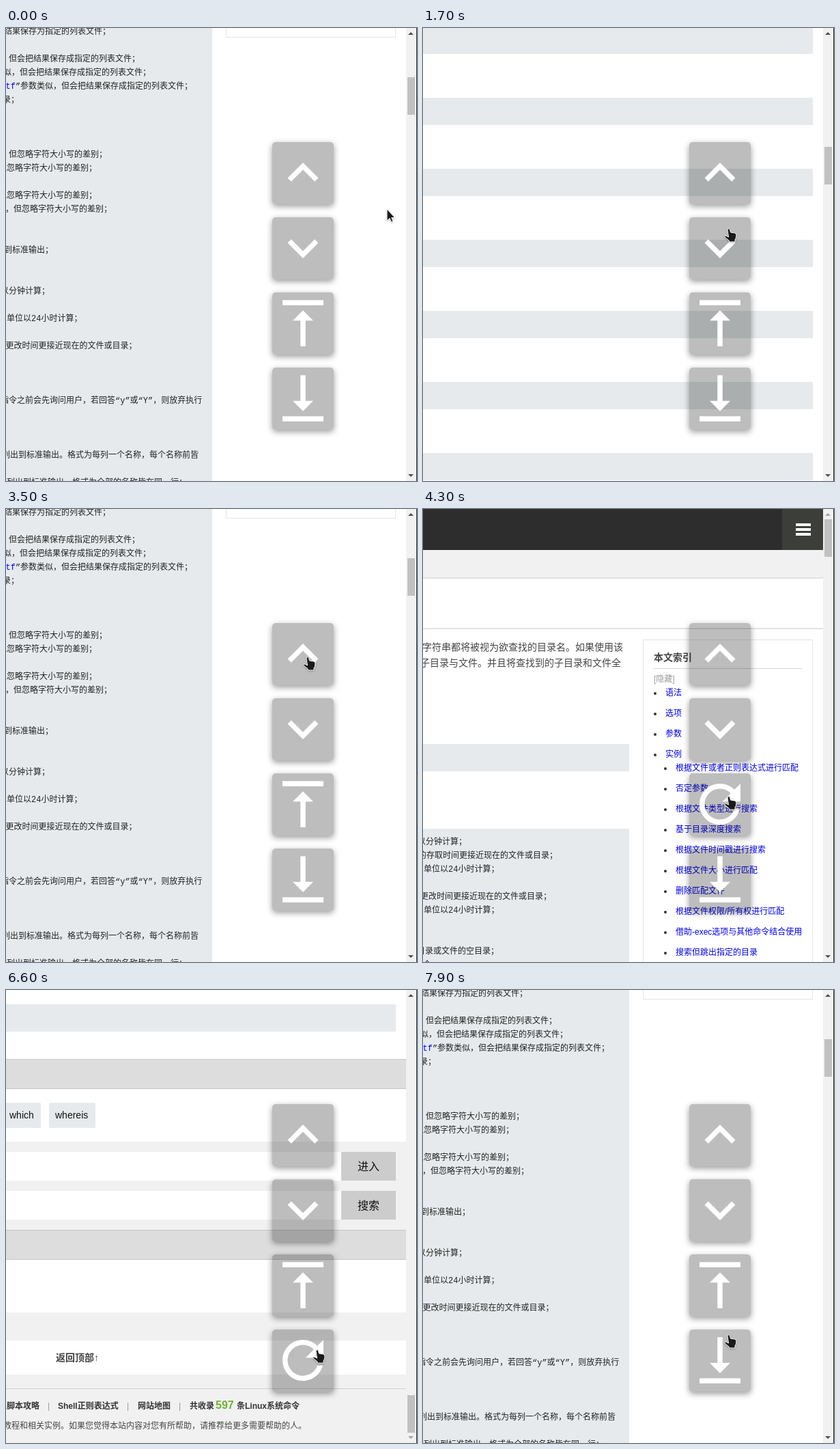
Animation, 602 px wide and 663 px high, one loop 8 s. Source, as an HTML page:

```html
<!DOCTYPE html>
<html lang="zh-CN">
<head>
<meta charset="utf-8">
<style>
html, body { margin: 0; width: 100%; height: 100%; overflow: hidden; background: #fff; }
#stage { position: relative; width: 602px; height: 663px; overflow: hidden; }
#stage div, #stage span, #stage svg { position: absolute; }
#page { left: 0; top: 0; width: 586px; height: 7579px; overflow: hidden; background: #fff; }
span { white-space: pre; line-height: 20px; font: 12px/20px "Liberation Sans", "Noto Sans CJK SC", sans-serif; color: #333; }
.code { font-family: "Liberation Mono", "Noto Sans CJK SC", monospace; color: #222; margin-top: 2px; }
.code b { font-weight: 400; color: #00f; }
.prose { font-size: 14px; color: #444; }
.title { font-size: 14px; font-weight: 700; color: #444; }
.link { color: #00e; }
.mute { color: #999; }
.tag { font-size: 14px; color: #111; }
.go { font-size: 16px; color: #111; }
.bold { font-weight: 700; }
.count { font-size: 16px; font-weight: 700; color: #70b235; }
.dot { width: 4px; height: 4px; border-radius: 50%; background: #333; }
.btn { left: 390px; width: 90px; height: 91px; border-radius: 5px; background: rgba(0,0,0,.26); box-shadow: 0 3px 10px rgba(0,0,0,.4); }
.btn svg { left: 0; top: 0; width: 90px; height: 90px; fill: #fff; }
#cursor { left: 0; top: 0; width: 602px; height: 663px; filter: drop-shadow(0 1px 1px rgba(0,0,0,.3)); }
</style>
</head>
<body>
<div id="stage">
  <div id="page"></div>
  <div id="buttons"></div>
  <div id="bar"></div>
  <svg id="cursor"><path fill="#1a1a1a" stroke="#fff"/></svg>
</div>
<script>
const $ = id => document.getElementById(id);
const TOP = 0, MID = 682, DOWN = 1295, FAR = 1908, END = 6916;
const GRAY = '#f1f1f1', PANEL = '#e6eaec', HEAD = '#ddd';

function box(x, y, w, h, color, parent = $('page'), extra = '') {
  const el = document.createElement('div');
  el.style.cssText = `left:${x}px;top:${y}px;width:${w}px;height:${h}px;background:${color};${extra}`;
  return parent.appendChild(el);
}
// y is the middle of the line
function text(x, y, html, cls) {
  const el = document.createElement('span');
  el.className = cls;
  el.style.left = x + 'px';
  el.style.top = y - 10 + 'px';
  el.innerHTML = html;
  $('page').appendChild(el);
}
function dot(x, y) { box(x - 2, y - 1, 4, 4, '#333').className = 'dot'; }

// Header and introduction
box(0, 0, 586, 60, '#2d2d2d');
box(526, 0, 60, 60, '#3c3e39');
for (const y of [21, 28, 35]) box(546, y, 22, 4, '#fff');
box(0, 60, 586, 40, GRAY);
box(0, 100, 586, 2, '#e2e2e2');
box(0, 174, 586, 2, '#e2e2e2');
text(-1, 202, '字符串都将被视为欲查找的目录名。如果使用该', 'prose');
text(-4, 225, '子目录与文件。并且将查找到的子目录和文件全', 'prose');
box(0, 344, 302, 40, PANEL);
box(0, 468, 302, 1140, PANEL);

// Index
box(322, 191, 247, 503, '#fff', $('page'), 'border:1px solid #e5e5e5');
text(338, 217, '本文索引', 'title');
box(338, 233, 217, 0, 'none', $('page'), 'border-top:1px dotted #aaa');
text(338, 249, '[隐藏]', 'mute');
['语法', '选项', '参数', '实例'].forEach((s, i) => {
  dot(340, 269 + 30 * i);
  text(355, 269 + 30 * i, s, 'link');
});
['根据文件或者正则表达式进行匹配', '否定参数', '根据文件类型进行搜索', '基于目录深度搜索',
 '根据文件时间戳进行搜索', '根据文件大小进行匹配', '删除匹配文件', '根据文件权限/所有权进行匹配',
 '借助-exec选项与其他命令结合使用', '搜索但跳出指定的目录'].forEach((s, i) => {
  dot(355, 379 + 30 * i);
  text(370, 379 + 30 * i, s, 'link');
});

// Option list
const saved = '但会把结果保存成指定的列表文件；', caseless = '但忽略字符大小写的差别；';
const hours = '单位以24小时计算；', newer = '更改时间更接近现在的文件或目录；';
[[486, -8, '以分钟计算；'], [506, -7, '的存取时间更接近现在的文件或目录；'], [526, 1, hours],
 [566, -4, newer], [586, 1, hours], [646, -9, '目录或文件的空目录；'], [666, 0, '个。'],
 [686, -3, '结果保存为指定的列表文件；'], [726, 4, saved], [746, -4, '似，' + saved],
 [766, -.5, '<b>tf</b>”参数类似，' + saved], [786, -5, '录；'],
 [866, 4, caseless], [886, -11, caseless], [926, -11, caseless], [946, -1, '，' + caseless],
 [1006, -3, '到标准输出；'], [1066, -8, '以分钟计算；'], [1106, 1, hours], [1146, -.5, newer],
 [1226, -8, '指令之前会先询问用户，若回答“y”或“Y”，则放弃执行'],
 [1306, -6, '列出到标准输出。格式为每列一个名称，每个名称前皆'],
 [1346, -11, '称列出到标准输出。格式为全部的名称皆在同一行；'],
 [1366, -9, '件或目录名称列出到标准输出。格式可以自行指定；'], [1406, -1, '；'],
 [1506, -8, '过的文件或目录，单位以日计算；'], [1586, -11, '区别在于它针对符号连接检查。'],
].forEach(([y, x, s]) => text(x, y, s, 'code'));

// Examples
for (let i = 0; i < 7; i++) box(0, 1906 + 104 * i, 571, 40, PANEL);

// Foot of the page
const foot = (x, y, w, h, color, extra) => box(x, END + y, w, h, color, $('page'), extra);
const note = (x, y, s, cls) => text(x, END + y, s, cls);
foot(0, 21, 571, 40, PANEL);
foot(0, 222, 586, 441, GRAY);
for (const y of [101, 351]) foot(0, y, 586, 42, HEAD, 'border:solid #c8c8c8;border-width:1px 0');
foot(-20, 165, 71, 37, PANEL, 'border-radius:2px');
foot(63, 165, 68, 37, PANEL, 'border-radius:2px');
note(5, 183, 'which', 'tag');
note(72, 183, 'whereis', 'tag');
[[237, '进入'], [294, '搜索']].forEach(([y, s]) => {
  foot(0, y, 491, 42, '#fff');
  foot(491, y, 80, 42, '#ccc');
  note(515, y + 22, s, 'go');
});
foot(0, 395, 586, 77, '#fff');
foot(0, 513, 586, 50, '#fff');
note(73, 538, '返回顶部↑', 'title');
foot(0, 583, 586, 1, '#d2d2d2');
note(1, 609, '脚本攻略', 'bold');
note(76, 609, 'Shell正则表达式', 'bold');
note(193, 609, '网站地图', 'bold');
note(269, 609, '共收录', 'bold');
note(307, 608, '597', 'count');
note(338, 609, '条Linux系统命令', 'bold');
for (const x of [61, 177, 253]) note(x, 609, '|', 'mute');
note(-4, 638, '教程和相关实例。如果您觉得本站内容对您有所帮助，请推荐给更多需要帮助的人。', 'prose');
$('page').lastChild.style.fontSize = '12px';

// Floating buttons
const ICONS = [
  'M7.41 15.41L12 10.83l4.59 4.58L18 14l-6-6-6 6z',
  'M7.41 8.59L12 13.17l4.59-4.58L18 10l-6 6-6-6z',
  'M8 11h3v10h2V11h3l-4-4-4 4zM4 3v2h16V3H4z',
  'M16 13h-3V3h-2v10H8l4 4 4-4zM4 19v2h16v-2H4z'];
const BACK = 'M17.65 6.35A7.96 7.96 0 0 0 12 4c-4.42 0-7.99 3.58-7.99 8s3.57 8 7.99 8c3.73 0 6.84-2.55 7.73-6h-2.08A5.99 5.99 0 0 1 12 18c-3.31 0-6-2.69-6-6s2.69-6 6-6c1.66 0 3.14.69 4.22 1.78L13 11h7V4z';
$('buttons').innerHTML = ICONS.map((d, i) =>
  `<div class="btn" style="top:${167 + 110 * i}px"><svg viewBox="0 0 24 24"><path d="${d}"/></svg></div>`).join('');
const icons = document.querySelectorAll('.btn path');

// Scrollbar
box(586, 0, 15, 663, GRAY, $('bar'));
box(601, 0, 1, 663, '#2b2b2b', $('bar'));
const thumb = box(588, 15, 11, 55, '#c1c1c1', $('bar'));
const upArrow = box(589, 6, 8, 4, '#505050', $('bar'), 'clip-path:polygon(50% 0,100% 100%,0 100%)');
const downArrow = box(589, 653, 8, 4, '#505050', $('bar'), 'clip-path:polygon(0 0,100% 0,50% 100%)');

// [time, scroll position]
const SCROLLS = [[0, MID], [1100, DOWN], [1700, FAR], [2400, DOWN], [3500, MID],
  [4300, TOP], [5800, MID], [6600, END], [7400, MID]];
// [start, steps of 100 ms, x, y]
const MOVES = [[200, 7, 447, 293], [2000, 1, 474, 270], [2100, 2, 441, 216],
  [3600, 5, 447, 420], [6500, 1, 455, 526], [7800, 2, 447, 504]];
const ARROW = 'M0 0V17L4 13.5L6.5 19L9 18L6.7 12.5H11.5Z';
const HAND = 'M-.5 1Q1.5-.3 2.5 2L3.5 6L9.5 7Q12 7.5 12 10L11.5 14L10 17V20H1.5L1 18L-5 13Q-6 11.5-4.5 11Q-3 10.7 .5 13L-1 2.5Z';
const cursor = document.querySelector('#cursor path');

function pointer(t) {
  let x = 558, y = 265;
  for (const [start, steps, tx, ty] of MOVES) {
    if (t < start) break;
    const p = Math.min(1, (Math.floor((t - start) / 100) + 1) / steps);
    x += (tx - x) * p;
    y += (ty - y) * p;
  }
  return [x, y];
}

function draw(now) {
  const t = now % 8000;
  const scroll = SCROLLS.filter(s => s[0] <= t).pop()[1];
  $('page').style.top = -scroll + 'px';
  thumb.style.top = 15 + Math.round(scroll / END * 578) + 'px';
  upArrow.style.background = scroll === TOP ? '#a3a3a3' : '#505050';
  downArrow.style.background = scroll === END ? '#a3a3a3' : '#505050';
  icons[2].setAttribute('d', scroll === TOP ? BACK : ICONS[2]);
  icons[3].setAttribute('d', scroll === END ? BACK : ICONS[3]);
  const [x, y] = pointer(t);
  const over = x >= 390 && x < 480 && y >= 167 && (y - 167) % 110 < 91;
  cursor.setAttribute('d', over ? HAND : ARROW);
  cursor.setAttribute('transform', `translate(${x} ${y})`);
  requestAnimationFrame(draw);
}
requestAnimationFrame(draw);
</script>
</body>
</html>
```
